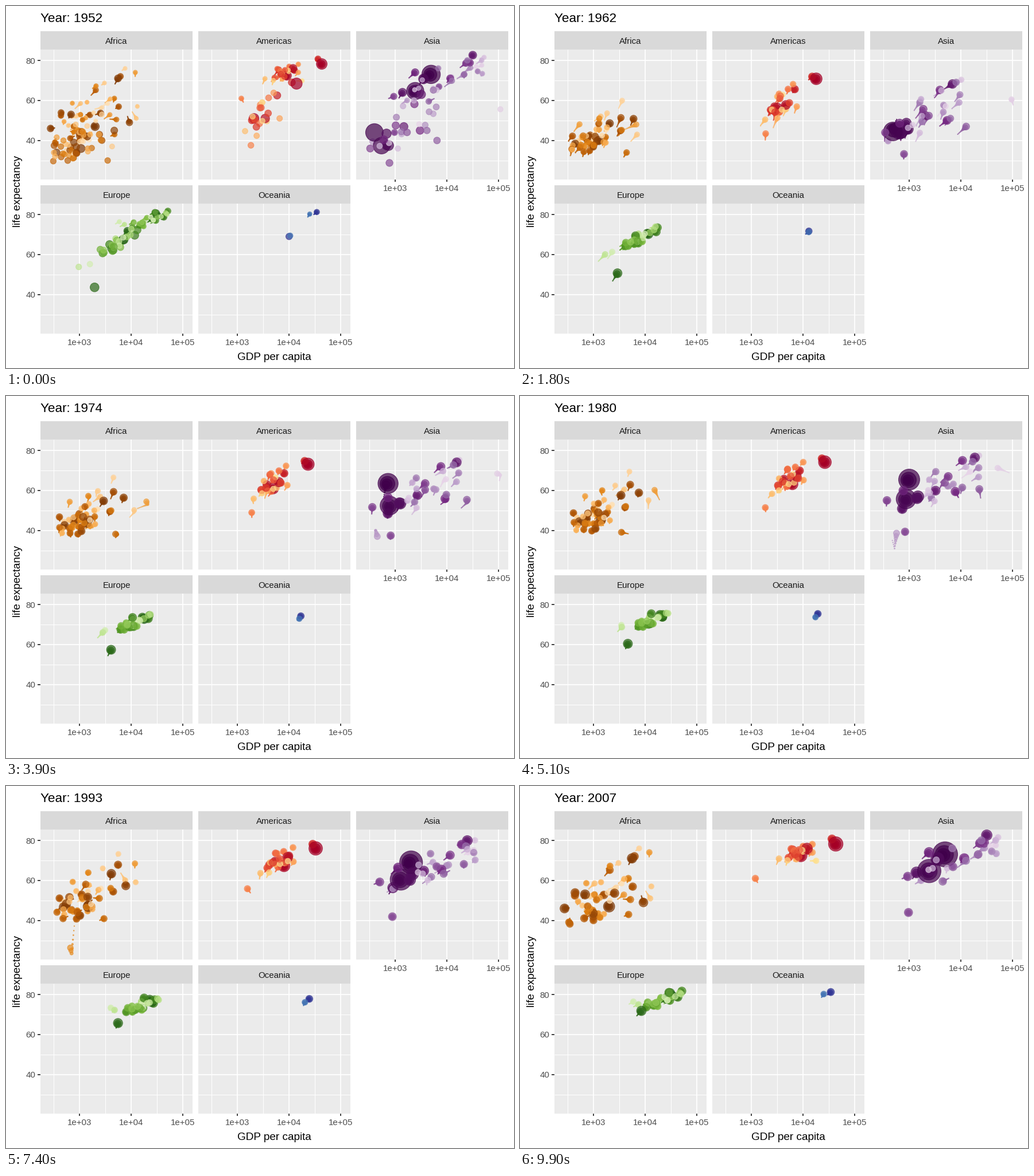
Animation of 885x632 px, one loop 10 s. Source, as a matplotlib script:

```python
import numpy as np
import matplotlib.pyplot as plt
from matplotlib.animation import FuncAnimation
from matplotlib.colors import LinearSegmentedColormap
from matplotlib.patches import Rectangle

W, H, DPI = 885, 632, 100
PX = 72 / DPI                      # points per pixel
FRAMES, WAKE = 100, 10
FIRST, MID, LAST = 1952, 1987, 2007
TIMES = np.linspace(FIRST, LAST, FRAMES)
CENSUS = np.arange(FIRST, LAST + 1, 5)
RISE = np.sin(np.pi * np.clip((CENSUS - FIRST) / (MID - FIRST), 0, 1))
SAG = np.sin(np.pi * np.clip((CENSUS - MID) / (LAST - MID), 0, 1))

plt.rcParams["font.family"] = "Liberation Sans"
fig = plt.figure(figsize=(W / DPI, H / DPI), dpi=DPI, facecolor="white")
ax = fig.add_axes([0, 0, 1, 1])
ax.set(xlim=(0, W), ylim=(H, 0))
ax.axis("off")

PANEL_W, PANEL_H, STRIP = 265, 227, 31.5
LEFTS, TOPS = (60, 335, 610), (75.5, 344.5)
NAMES = "Africa Americas Asia Europe Oceania".split()
PANELS = {n: (LEFTS[i % 3], TOPS[i // 3]) for i, n in enumerate(NAMES)}


def to_x(left, log_gdp):
    return left + (log_gdp - 2.2487) * 90.2


def to_y(top, life):
    return top + (85.55 - life) * 3.497


def label(x, y, text, size, color="black", **kw):
    return ax.text(x, y, text, fontsize=size * PX, color=color, va="baseline", **kw)


def line(xs, ys, width, color):
    ax.plot(xs, ys, color=color, lw=width * PX, solid_capstyle="butt", zorder=1)


def draw_panel(name, left, top):
    right, bottom = left + PANEL_W, top + PANEL_H
    ax.add_patch(Rectangle((left, top - STRIP), PANEL_W, STRIP, fc="#D9D9D9", lw=0))
    ax.add_patch(Rectangle((left, top), PANEL_W, PANEL_H, fc="#EBEBEB", lw=0))
    label(left + PANEL_W / 2, top - 9.2, name, 15, "#1A1A1A", ha="center")
    decades, lives = np.arange(3, 6), np.arange(40, 81, 20)
    for shift, width in ((1, 1), (0, 1.8)):
        for v in decades - shift / 2:
            line([to_x(left, v)] * 2, [top, bottom], width, "white")
        for v in lives - 10 * shift:
            line([left, right], [to_y(top, v)] * 2, width, "white")
    if left == LEFTS[0]:
        for v in lives:
            y = to_y(top, v)
            line([left - 4.6, left], [y, y], 1.8, "#333333")
            label(left - 8.5, y + 5.6, str(v), 15, "#4D4D4D", ha="right")
    if name in NAMES[2:]:
        for v in decades:
            x = to_x(left, v)
            line([x, x], [bottom, bottom + 4.6], 1.8, "#333333")
            label(x, bottom + 20.8, f"1e+0{v}", 15, "#4D4D4D", ha="center")


for name, corner in PANELS.items():
    draw_panel(name, *corner)
label(467.5, 618, "GDP per capita", 19, ha="center")
label(25.5, 323, "life expectancy", 19, ha="center", rotation=90,
      rotation_mode="anchor")
title = label(60, 28, "", 22.5)

rng = np.random.default_rng(7)
LETTERS = list("ABCDEFGHIJKLMNOPRSTUVZ")
countries = []


def stop_years(count):
    """Years of a path given by two to five points."""
    extra = [MID, 1972, 1962][:count - 2]
    return sorted([FIRST, LAST] + extra)


def known(values, dip):
    """Path through a few GDP, life pairs."""
    pairs = np.reshape(values, (-1, 2))
    knots = [(y, *p) for y, p in zip(stop_years(len(pairs)), pairs)]
    knots += [tuple(d) for d in np.reshape(dip, (-1, 3))]
    year, gdp, life = np.array(sorted(knots)).T
    return (np.interp(CENSUS, year, np.log10(gdp)),
            np.interp(CENSUS, year, life), len(pairs) < 4)


def typical(stops, rho):
    """Path of a country that keeps its rough standing in the continent."""
    base = rng.normal(size=2)
    points = []
    for gdp, gdp_sd, life, life_sd in stops:
        z, w = np.clip(0.92 * base + 0.39 * rng.normal(size=2), -1.7, 1.7)
        w = np.clip(rho * z + np.sqrt(1 - rho * rho) * w, -1.9, 1.9)
        points.append((gdp + gdp_sd * z, life + life_sd * w))
    xs, ys = np.transpose(points)
    years = stop_years(3)
    wobble = rng.normal(0, 0.015, CENSUS.size)
    return np.interp(CENSUS, years, xs) + wobble, np.interp(CENSUS, years, ys), True


def add(panel, count, ramp, biggest, scale, decay, growth, swell,
        stops, rho, famous, dips={}):
    """Countries rank by population; famous ones start with their rank."""
    left, top = PANELS[panel]
    cmap = LinearSegmentedColormap.from_list(panel, ramp.split())
    by_rank = {v[0]: (name, v[1:]) for name, v in famous.items()}
    for rank in range(count):
        if rank in by_rank:
            name, values = by_rank[rank]
            x, y, bends = known(values, dips.get(name, ()))
        else:
            name = rng.choice(LETTERS)
            x, y, bends = typical(stops, rho)
        if bends:
            x = x + swell * (RISE - SAG / 2)
            y = y + 0.1 * (y[7] - y[0]) * RISE
        pop = biggest[rank] if rank < len(biggest) else scale * np.exp(-decay * rank)
        pop = pop * growth ** ((LAST - TIMES) / (LAST - FIRST))
        countries.append((name, to_x(left, np.interp(TIMES, CENSUS, x)),
                          to_y(top, np.interp(TIMES, CENSUS, y)),
                          2 + 10 * np.sqrt(pop / 1319), cmap(rank / (count - 1))))


add("Africa", 52, "#7F3B08 #B35806 #E08214 #FDB863 #FEE0B6",
    [135], 80, .1, .27, .05,
    [(2.97, .27, 38.8, 4.8), (3.12, .3, 52.5, 6.5), (3.15, .36, 53.5, 8)], .5,
    {"Nigeria": (0, 1077, 36, 1385, 47, 2014, 47),
     "Egypt": (1, 1419, 42, 3885, 60, 5581, 71),
     "Ethiopia": (2, 362, 34, 691, 53),
     "Congo": (3, 781, 39, 673, 47, 278, 46),
     "South Africa": (4, 4725, 45, 7826, 61, 9270, 49),
     "Algeria": (9, 2449, 43, 5681, 66, 6223, 72),
     "Angola": (19, 3521, 30, 5473, 38, 2430, 40, 4797, 43),
     "Rwanda": (28, 493, 40, 848, 44, 863, 46),
     "Libya": (32, 2388, 43, 6757, 48, 21011, 53, 11770, 66, 12057, 74),
     "Botswana": (42, 851, 48, 2264, 56, 6206, 64, 12570, 51),
     "Gabon": (44, 4293, 37, 11402, 49, 11864, 60, 13206, 57),
     "Reunion": (47, 2719, 53, 5303, 72, 7670, 76)},
    {"Rwanda": (1992, 737, 23.6, 1997, 590, 36)})

add("Americas", 25, "#A50026 #D73027 #F46D43 #FDAE61 #FEE090",
    [301, 190, 109], 80, .15, .45, .02,
    [(3.47, .19, 52.5, 8), (3.74, .19, 67, 5), (3.88, .2, 73.2, 3)], .6,
    {"United States": (0, 13990, 68.4, 29884, 75, 42952, 78.2),
     "Brazil": (1, 2109, 51, 7807, 65, 9066, 72.4),
     "Mexico": (2, 3478, 51, 8688, 69.5, 11978, 76),
     "Colombia": (3, 2144, 50.6, 4903, 68, 7007, 73),
     "Argentina": (4, 5911, 62.5, 9140, 71, 12779, 75),
     "Canada": (5, 11367, 69, 26627, 77, 36319, 80.7),
     "Haiti": (14, 1840, 37.6, 1823, 53.6, 1202, 61),
     "Trinidad": (24, 3023, 59, 7389, 69.6, 18009, 69.8)})

add("Asia", 33, "#40004B #762A83 #9970AB #C2A5CF #E7D4E8",
    [1319, 1110, 224, 169], 220, .14, .4, 0,
    [(3.25, .32, 49, 8.5), (3.77, .42, 67, 6.5), (3.93, .46, 72, 5)], .75,
    {"China": (0, 400, 44, 488, 44.5, 677, 63, 1379, 67.3, 4959, 73),
     "India": (1, 547, 37.4, 977, 58.6, 2452, 64.7),
     "Indonesia": (2, 750, 37.5, 1748, 60, 3541, 70.7),
     "Pakistan": (3, 685, 43.4, 1705, 58, 2606, 65.5),
     "Bangladesh": (4, 684, 37.5, 752, 53, 1391, 64),
     "Japan": (5, 3217, 63, 14779, 73.4, 22376, 78.7, 31656, 82.6),
     "Vietnam": (7, 605, 40.4, 821, 63, 2442, 74),
     "Iran": (8, 3035, 45, 9614, 55, 6643, 63, 11606, 71),
     "Korea": (10, 1031, 47.5, 8533, 70, 23348, 78.6),
     "Myanmar": (11, 331, 36, 385, 58, 944, 62),
     "Afghanistan": (12, 779, 28.8, 852, 41, 975, 44),
     "Saudi Arabia": (14, 6460, 40, 24838, 54, 21198, 66, 21655, 73),
     "Iraq": (15, 4130, 45, 9577, 57, 11644, 65, 4471, 59.5),
     "Cambodia": (22, 368, 39.4, 422, 40, 684, 54, 1714, 60),
     "Singapore": (26, 2315, 60, 18862, 73.6, 47143, 80),
     "Kuwait": (31, 108382, 55.6, 95458, 60.5, 109348, 67.7, 28118, 74, 47307, 77.6)},
    {"Cambodia": (1977, 525, 31), "China": (1957, 576, 50.5)})

add("Europe", 30, "#276419 #4D9221 #7FBC41 #B8E186 #E6F5D0",
    [82, 71], 75, .12, .76, .07,
    [(3.76, .21, 66.3, 3.8), (4.2, .16, 73.5, 2.2), (4.38, .2, 77.6, 2.4)], .85,
    {"Germany": (0, 7144, 67.5, 24639, 75, 32170, 79.4),
     "Turkey": (1, 1969, 43.6, 5089, 63, 8458, 71.8),
     "France": (2, 7030, 67.4, 22066, 76, 30470, 80.7),
     "Spain": (5, 3834, 65, 15765, 77, 28821, 81),
     "Norway": (22, 10095, 72.7, 31541, 76, 49357, 80.2),
     "Bosnia": (23, 974, 53.8, 4314, 71, 7446, 75),
     "Albania": (26, 1601, 55.2, 3739, 72, 5937, 76.4)})

add("Oceania", 2, "#313695 #4575B4", [20, 4], 1, 0, .45, .02, [], 0,
    {"Australia": (0, 10040, 69, 21889, 76.3, 34435, 81.2),
     "New Zealand": (1, 10557, 69.4, 19007, 74.3, 25185, 80.2)})

countries.sort(key=lambda c: c[0])
_, xs, ys, sizes, colors = zip(*countries)
places = np.stack([np.transpose(xs), np.transpose(ys)], axis=-1)
sizes = np.transpose(sizes)

ages = np.arange(WAKE, -1, -1)
falloff = ((1 - ages / WAKE) ** 3)[:, None]
rgba = np.tile(np.array(colors) * [1, 1, 1, 0.7], (WAKE + 1, 1))
dots = ax.scatter(np.zeros(len(rgba)), np.zeros(len(rgba)), s=1, c=rgba,
                  edgecolors=rgba, linewidths=1.1 * PX, zorder=3)


def update(i):
    shown = (i - ages) % FRAMES
    diameter = 0.75 * (2.845 * sizes[shown] * falloff + 0.945) * 120 / DPI
    dots.set_offsets(places[shown].reshape(-1, 2))
    dots.set_sizes(diameter.ravel() ** 2)
    title.set_text(f"Year: {round(TIMES[i])}")
    return dots, title


anim = FuncAnimation(fig, update, frames=FRAMES, interval=100, repeat=True,
                     repeat_delay=0)
plt.show()
```
